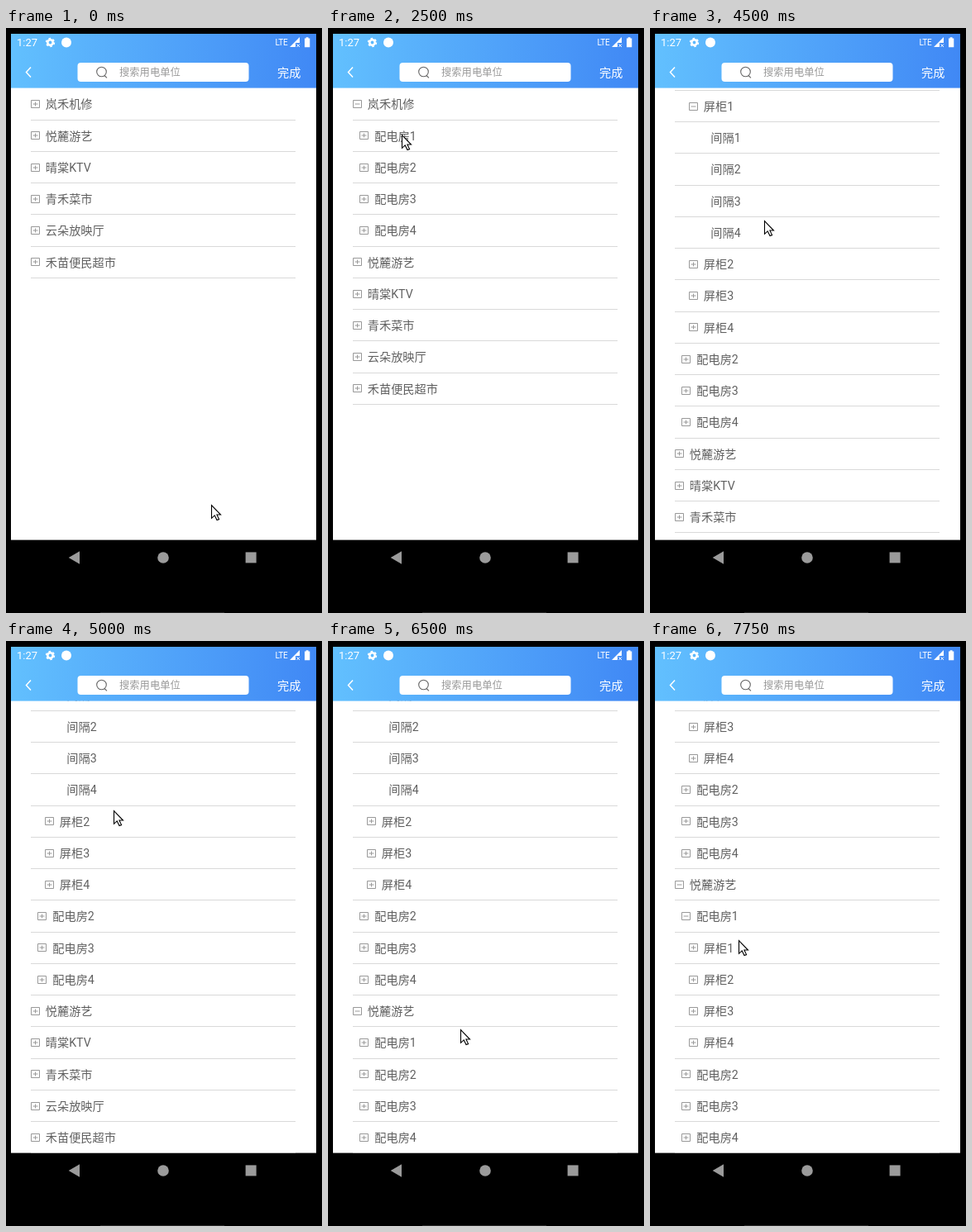
An HTML page that plays this animation: 382 px wide and 708 px high, repeating every 8000 ms.

```html
<!DOCTYPE html>
<html lang="zh-CN">
<head>
<meta charset="utf-8">
<title>用电单位</title>
<style>
  html, body { margin: 0; width: 100%; height: 100%; overflow: hidden; background: #000; }
  svg { display: block; width: 100%; height: 100%; }
  text { font-family: Roboto, "Noto Sans CJK SC", "Noto Sans CJK", sans-serif; }
  #list text { font-size: 14.2px; fill: #606060; }
  #list path { fill: none; stroke: #999; }
  #list .rule { stroke: #d9d9d9; }
</style>
</head>
<body>
<svg viewBox="0 0 382 708">
  <defs>
    <linearGradient id="sky" gradientUnits="userSpaceOnUse" x1="6" y1="40" x2="375" y2="65">
      <stop offset="0" stop-color="#62c0fe"/>
      <stop offset="1" stop-color="#4088f5"/>
    </linearGradient>
    <clipPath id="view"><path d="M6 72.6H375V619.6H6Z"/></clipPath>
  </defs>
  <rect width="382" height="708"/>
  <rect x="6" y="7" width="369" height="612.6" fill="#fff"/>
  <g clip-path="url(#view)">
    <g id="list"></g>
    <path id="glow" d="M6 620V611Q190 583 375 611V620Z" fill="#4a9cf5"/>
  </g>

  <rect x="6" y="7" width="369" height="65.6" fill="url(#sky)"/>
  <g fill="#fff">
    <text x="13" y="22.3" font-size="13">1:27</text>
    <circle cx="53.5" cy="17.5" r="3.2" fill="none" stroke="#fff" stroke-width="2.6"/>
    <circle cx="53.5" cy="17.5" r="4.9" fill="none" stroke="#fff" stroke-width="1.6" stroke-dasharray="2.6 2.53"/>
    <circle cx="73" cy="17.5" r="6"/>
    <text x="325.5" y="21.3" font-size="10" letter-spacing="-.3">LTE</text>
    <path d="M343 23 355 11V18H350V23Z"/>
    <path d="M351.5 19.5 355 23M355 19.5 351.5 23" stroke="#fff"/>
    <path d="M361 12.5H362.7V11.3H365.5V12.5H367.3V23.3H361Z"/>
    <path d="M30 47.5 24.5 53.5 30 59.5" fill="none" stroke="#fff" stroke-width="1.5"/>
    <rect x="86.5" y="42" width="207" height="23" rx="4"/>
    <text x="328" y="58.7" font-size="14.2">完成</text>
  </g>
  <g fill="none" stroke="#666" stroke-width="1.1">
    <circle cx="115.5" cy="53" r="5.8"/>
    <path d="M119 57.5 122 60.3"/>
  </g>
  <text x="137" y="57.8" font-size="12.3" fill="#999">搜索用电单位</text>

  <g fill="#9b9b9b">
    <path d="M75.7 641 89 633.3V648.7Z"/>
    <circle cx="190" cy="641" r="6.8"/>
    <rect x="289.6" y="634.4" width="13" height="13"/>
    <path d="M114 707H264V708H114Z" fill="#282828"/>
  </g>
  <path id="cursor" d="M.5 .5V16.3L4.2 12.9 7 18.6 9.6 17.6 6.9 12H11.5Z" fill="#fff" stroke="#000" stroke-width="1.1"/>
</svg>
<script>
const STEP = 250, LOOP = 8000, PITCH = 38.25, TOP = 73, VIEW = 547;
const units = ['岚禾机修', '悦麓游艺', '晴棠KTV', '青禾菜市', '云朵放映厅', '禾苗便民超市'];
const levels = ['配电房', '屏柜', '间隔'];

// Pointer stops: "open" unfolds a node on arrival, "drag" scrolls on the way there.
const stops = [
  { step: 0, x: 248, y: 577 },
  { step: 5, x: 67, y: 110 },
  { step: 6, x: 67, y: 110, open: '0' },
  { step: 10, x: 89, y: 129 },
  { step: 12, x: 89, y: 129, open: '0.1' },
  { step: 13, x: 104, y: 165 },
  { step: 15, x: 104, y: 165, open: '0.1.1' },
  { step: 17, x: 139, y: 307 },
  { step: 19, x: 137, y: 159, drag: true },
  { step: 23, x: 94, y: 454 },
  { step: 24, x: 94, y: 454, open: '1' },
  { step: 26, x: 160, y: 470 },
  { step: 28, x: 159, y: 281, drag: true },
  { step: 30, x: 104, y: 338, open: '1.1' },
  { step: 31, x: 107, y: 362 }
];

const $ = id => document.getElementById(id);
const clamp = (v, low, high) => Math.min(high, Math.max(low, v));
const smooth = p => p * p * (3 - 2 * p);

function visibleRows(open) {
  const rows = [];
  const add = (id, label, depth) => {
    rows.push({ label, depth, open: open.has(id) });
    if (open.has(id)) for (let n = 1; n <= 4; n++) add(id + '.' + n, levels[depth] + n, depth + 1);
  };
  units.forEach((name, i) => add(String(i), name, 0));
  return rows;
}

// Replays the gestures up to the given step.
function stateAt(step) {
  const open = new Set();
  let { x, y } = stops[0], offset = 0, excess = 0, rows = visibleRows(open);
  for (let i = 1; i < stops.length && stops[i - 1].step < step; i++) {
    const from = stops[i - 1], to = stops[i];
    const linear = clamp((step - from.step) / (to.step - from.step), 0, 1);
    const p = to.drag ? linear : smooth(linear);
    x = from.x + (to.x - from.x) * p;
    y = from.y + (to.y - from.y) * p;
    excess = 0;
    if (to.drag) {
      const wanted = offset + from.y - y;
      offset = clamp(wanted, 0, rows.length * PITCH - VIEW);
      excess = wanted - offset;
    }
    if (to.open && step >= to.step) rows = visibleRows(open.add(to.open));
  }
  return { x, y, offset, excess, rows };
}

function rowMarkup({ label, depth, open }, top) {
  const x = 30 + depth * 8.5, left = Math.floor(x) + .5, y = Math.round(top + 14) + .5;
  const rule = Math.round(top + 37.5) + .5;
  const icon = depth < 3
    ? `<path d="M${left} ${y}h10v9h-10zM${left + 2} ${y + 4.5}h6${open ? '' : 'm-3 -2.5v5'}"/>` : '';
  return `${icon}<text x="${x + 17.8}" y="${top + 24.3}">${label}</text>
    <path class="rule" d="M30 ${rule}H350"/>`;
}

function render(step) {
  const { x, y, offset, excess, rows } = stateAt(step);
  $('list').innerHTML = rows.map((row, i) => rowMarkup(row, TOP + i * PITCH - offset)).join('');
  $('cursor').setAttribute('transform', `translate(${Math.round(x)} ${Math.round(y)})`);
  $('glow').setAttribute('opacity', excess / 1200);
}

let shown = -1;
const start = performance.now();
function tick() {
  const step = Math.floor((performance.now() - start) % LOOP / STEP);
  if (step !== shown) render(shown = step);
  requestAnimationFrame(tick);
}
tick();
</script>
</body>
</html>
```
